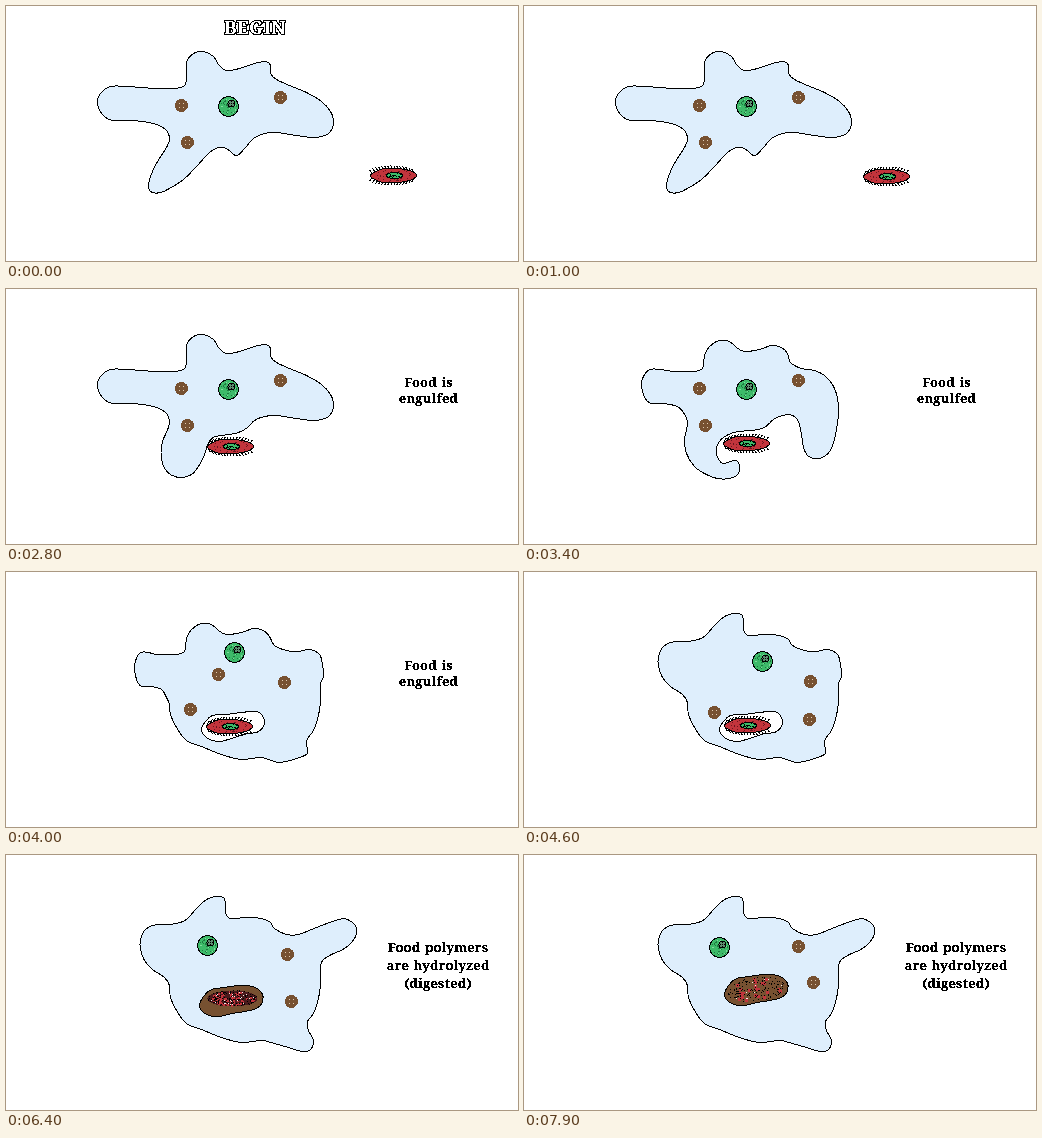
These frames come from a looping animation (512 by 255 pixels, 8 s). An HTML page:

```html
<!DOCTYPE html>
<html lang="en">
<head>
<meta charset="utf-8">
<title>Amoeba feeding</title>
<style>
html, body { margin: 0; width: 100%; height: 100%; overflow: hidden; background: #fff; }
svg { display: block; width: 512px; height: 255px; shape-rendering: crispEdges; }
text { font: bold 13px "Noto Serif", "DejaVu Serif", serif; text-anchor: middle; letter-spacing: .2px; word-spacing: 1px; }
.title { font-size: 18.5px; fill: #fff; stroke: #000; stroke-width: 2; paint-order: stroke; }
</style>
</head>
<body>
<svg id="stage" viewBox="0 0 512 255" xmlns="http://www.w3.org/2000/svg">
  <filter id="hard" x="-5%" y="-20%" width="110%" height="140%" color-interpolation-filters="sRGB">
    <feComponentTransfer>
      <feFuncR type="discrete" tableValues="0 1"/>
      <feFuncG type="discrete" tableValues="0 1"/>
      <feFuncB type="discrete" tableValues="0 1"/>
      <feFuncA type="discrete" tableValues="0 1 1"/>
    </feComponentTransfer>
  </filter>
</svg>
<script>
const LOOP = 8000;
const TIMES = [0, 1000, 1300, 1600, 1900, 2200, 2500, 2800, 3100, 3400,
  3700, 4000, 4300, 4600, 5050, 5650, 6400, 7150, 7900];
const CLOSED = 11, FUSED = 15, BROKEN = 16;   // steps where the meal changes state
const INK = '#000', BODY = '#deeefc', BROWN = '#775131', RED = '#c2343c', GREEN = '#3dba69';
const stage = document.getElementById('stage');

const pts = s => s.split(' ').map(p => p.split(',').map(Number));
const move = (list, dx, dy) => list.map(([x, y]) => [x + dx, y + dy]);
const lerp = (a, b, k) => a + (b - a) * k;

// Point at fraction u of a list
function along(list, u) {
  const f = u * (list.length - 1), i = Math.floor(f);
  const a = list[i], b = list[i + 1] || a;
  return [lerp(a[0], b[0], f - i), lerp(a[1], b[1], f - i)];
}

// Blend of two point lists; k above 1 carries the motion further
function mix(a, b, k) {
  if (k === 0) return a;
  if (k === 1) return b;
  const last = Math.max(a.length, b.length) - 1 || 1;
  return Array.from({ length: Math.max(a.length, b.length) }, (_, i) => {
    const p = along(a, i / last), q = along(b, i / last);
    return [lerp(p[0], q[0], k), lerp(p[1], q[1], k)];
  });
}

// A track holds [step, points] keys; between keys the points blend
function track(...keys) {
  const list = keys.map(([i, p]) => [i, typeof p === 'string' ? pts(p) : p]);
  return i => {
    const n = list.findIndex(key => key[0] >= i);
    if (n < 0) return list[list.length - 1][1];
    if (n === 0) return list[0][1];
    const [s, a] = list[n - 1], [e, b] = list[n];
    return mix(a, b, (i - s) / (e - s));
  };
}

// Outline pieces, clockwise: left lobe, top, right lobe, underside
const leftWide = pts('163,132 159,123 147,117 125,114 106,114 96,108 91,96 94,87 104,80 120,80 150,82 168,82 178,79');
const leftAt = edge => leftWide.map(([x, y]) => [x < 150 ? 163 - (163 - x) * (163 - edge) / 72 : x, y]);
const leftRound = pts('163,130 158,122 146,114 138,105 134,94 134,84 138,75 146,70 158,69 170,68 180,64');

const topBumps = pts('180,70 180,56 187,47 197,45 207,50 212,58 220,64 233,62 248,57 259,55 264,59 264,67');
const topSoft = pts('180,66 185,57 195,51 205,52 212,58 220,62 235,60 247,56 257,58 263,64');
const topHorn = pts('190,53 200,44 209,41 217,42 219,48 219,57 224,63 240,62 255,63 264,67');

const rightOut = pts('270,73 283,79 300,86 315,95 324,105 327,116 322,127 308,131 290,129 270,126 258,127');
const rightDown = pts('266,73 277,79 290,81 300,86 308,95 313,108 314,124 311,145 307,159 300,167 290,169 283,166 279,158 277,145 274,132 268,126 258,126');
const flank = pts('314,112 314,130 311,147 307,158 301,166');
const rightRound = [...pts('268,73 280,78 292,79 303,77 313,82 316,92 317,104'), ...flank, ...pts('300,172 301,181 290,186 272,190')];
const rightArm = [...pts('268,73 280,79 292,79 305,74 332,64 343,65 350,73 348,83 338,93 325,99 316,105'), ...flank,
  ...pts('302,175 307,185 304,194 296,196 282,192 268,188')];

const underOpen = pts('247,132 239,141 231,149 226,147 220,142 212,141 203,146 190,160 177,173 163,182 154,186 146,186 142,181 144,170 151,155 160,141');
const underHook = pts('249,130 240,138 228,141 213,142 202,146 194,153 192,162 194,170 199,174 206,172 212,171 215,177 213,185 205,189 193,189 180,184 170,177 162,164 160,150 162,140');
const underRound = pts('255,185 235,187 215,182 195,174 180,168 170,155 164,142');

const pocket = pts('195,157 199,149 206,143 220,142 235,140 250,139 257,145 257,154 250,160 240,161 225,166 212,169 200,165');
const gut = pts('193,151 197,141 205,134 218,132 232,130 246,131 255,137 256,146 250,153 238,156 226,158 212,161 200,159');
const prey = pts('-23,0 -18,-4 -9,-7 5,-7 16,-5 22,-2 23,1 16,5 3,7 -10,7 -19,4');

const left = track([7, leftWide], [9, leftAt(117)], [10, leftAt(128)], [11, leftAt(128)], [12, leftRound]);
const topEdge = track([8, topBumps], [9, topSoft], [11, topSoft], [12, topHorn]);
const right = track([7, rightOut], [9, rightDown], [10, mix(rightOut, rightDown, 1.12)],
  [CLOSED, rightRound], [13, rightRound], [15, rightArm]);
const under = track([5, underOpen], [9, underHook], [10, mix(underOpen, underHook, 1.12)], [CLOSED, underRound]);

const food = track([0, '387,169'], [1, '362,170'], [2, '327,173'], [4, '242,162'], [5, '217,160'],
  [7, '224,157'], [9, '222,154'], [13, '223,153'], [14, '217,147'], [16, '226,143'], [17, '229,134'], [18, '232,134']);
const sacShift = track([13, '0,0'], [14, '-7,-6'], [16, '0,0'], [17, '4,-11'], [18, '7,-11']);
const core = track([10, '222,100'], [11, '228,80'], [13, '238,89'], [15, '209,89'], [16, '201,90'], [18, '195,92']);
const grains = track([10, '175,99 274,91 181,136'], [13, '286,109 285,147 190,140'],
  [16, '281,99 285,146 197,138'], [18, '274,91 289,127 197,138']);

const captions = [
  { from: 0, to: 1, size: 'title', lines: ['BEGIN'], x: 249, y: 28 },
  { from: 6, to: 13, lines: ['Food is', 'engulfed'], x: 422.5, y: 98, gap: 16 },
  { from: 15, to: 19, lines: ['Food polymers', 'are hydrolyzed', '(digested)'], x: 432, y: 97, gap: 18 }
];

function add(parent, tag, attrs, label) {
  const el = document.createElementNS(stage.namespaceURI, tag);
  for (const k in attrs) el.setAttribute(k, attrs[k]);
  if (label) el.textContent = label;
  parent.append(el);
  return el;
}

// Closed Catmull-Rom curve through the points
function curve(list) {
  const n = list.length, at = i => list[(i + n) % n];
  const put = (x, y) => `${(x + .5).toFixed(1)},${(y + .5).toFixed(1)} `;
  let d = 'M' + put(...list[0]);
  for (let i = 0; i < n; i++) {
    const [a, b, c, e] = [at(i - 1), at(i), at(i + 1), at(i + 2)];
    d += 'C' + put(b[0] + (c[0] - a[0]) / 6, b[1] + (c[1] - a[1]) / 6)
      + put(c[0] - (e[0] - b[0]) / 6, c[1] - (e[1] - b[1]) / 6) + put(...c);
  }
  return d + 'Z';
}

const blob = (g, list, fill) => add(g, 'path', { d: curve(list), fill, stroke: INK });

const disc = (g, x, y, rx, ry, fill, stroke = 'none') =>
  add(g, 'ellipse', { cx: x + .5, cy: y + .5, rx, ry, fill, stroke });

const dots = (g, list, fill, size = 1) => add(g, 'path', {
  d: list.map(([x, y]) => `M${Math.round(x)},${Math.round(y)}h${size}v${size}h-${size}z`).join(''), fill });

function scatter(seed, n, x, y, rx, ry, tilt = 0) {
  const rand = () => (seed = (seed * 16807) % 2147483647) / 2147483647;
  rand();
  return Array.from({ length: n }, () => {
    const a = rand() * 2 * Math.PI, r = Math.sqrt(rand());
    const dx = Math.cos(a) * r * rx;
    return [x + dx, y + Math.sin(a) * r * ry + dx * tilt];
  });
}

function drawCore(g, x, y) {
  disc(g, x, y, 10, 10, GREEN, INK);
  dots(g, scatter(77, 40, x, y, 8, 8), '#1d7a40');
  dots(g, scatter(91, 14, x, y, 8, 8), '#7fdc9c');
  disc(g, x + 3, y - 3, 3.5, 3.5, '#5f8f72', INK);
  dots(g, move(pts('1,-3 3,-5 3,-1 5,-3 3,-3'), x, y), INK);
}

function drawGrain(g, x, y) {
  disc(g, x, y, 6.5, 6.5, BROWN);
  dots(g, move(pts('-2,-2 2,-2 -2,2 2,2'), x, y), '#e2cdb4');
}

function drawFood(g, x, y, lean) {
  let d = '';
  for (let i = -22; i <= 22; i += 3) {
    const h = 7 * Math.sqrt(1 - (i / 24) ** 2);
    for (const s of [-1, 1])
      d += `M${x + i + .5},${y + s * h + .5}l${lean * 2},${s * 3}`;
  }
  add(g, 'path', { d, stroke: INK, fill: 'none' });
  blob(g, move(prey, x, y), RED);
  dots(g, scatter(37, 44, x, y, 20, 6), '#6c161e');
  disc(g, x + 1, y, 8, 3, GREEN, INK);
  dots(g, scatter(53, 20, x + 1, y, 7, 2.5), INK);
}

// k runs from freshly broken (0) to nearly digested (1)
function drawMush(g, x, y, k) {
  const rx = 25 + 4 * k, ry = 8 + 4 * k, tilt = -.1 * k;
  if (k === 0) disc(g, x, y, rx, ry, '#4a1a1c');
  dots(g, scatter(11, 75 - 50 * k, x, y, rx - 3, ry - 1, tilt), RED, k ? 3 : 2);
  dots(g, scatter(23, 150, x, y, rx, ry, tilt), INK);
  dots(g, scatter(41, 28 - 18 * k, x, y, rx - 3, ry - 1, tilt), '#f4e4e4');
}

function drawStep(_, i) {
  const g = add(stage, 'g', { visibility: 'hidden' });
  const fused = i >= FUSED;
  const [meal] = food(i).map(p => p.map(Math.round));
  blob(g, [left, topEdge, right, under].flatMap(part => part(i)), BODY);
  if (i >= CLOSED) blob(g, move(fused ? gut : pocket, ...sacShift(i)[0]), fused ? BROWN : '#fff');
  if (i < BROKEN) drawFood(g, ...meal, i % 2 ? 1 : -1);
  else drawMush(g, ...meal, (i - BROKEN) / 2);
  drawCore(g, ...core(i)[0].map(Math.round));
  grains(i).slice(0, fused ? 2 : 3).forEach(p => drawGrain(g, ...p.map(Math.round)));
  for (const c of captions) {
    if (i < c.from || i >= c.to) continue;
    c.lines.forEach((line, n) => add(g, 'text',
      { x: c.x, y: c.y + n * (c.gap || 0), class: c.size || '', filter: 'url(#hard)' }, line));
  }
  return g;
}

const scenes = TIMES.map(drawStep);
let shown = -1;

function tick() {
  const t = performance.now() % LOOP;
  const now = TIMES.findLastIndex(start => start <= t);
  if (now !== shown) {
    scenes.forEach((g, i) => g.setAttribute('visibility', i === now ? 'visible' : 'hidden'));
    shown = now;
  }
  requestAnimationFrame(tick);
}
tick();
</script>
</body>
</html>
```
